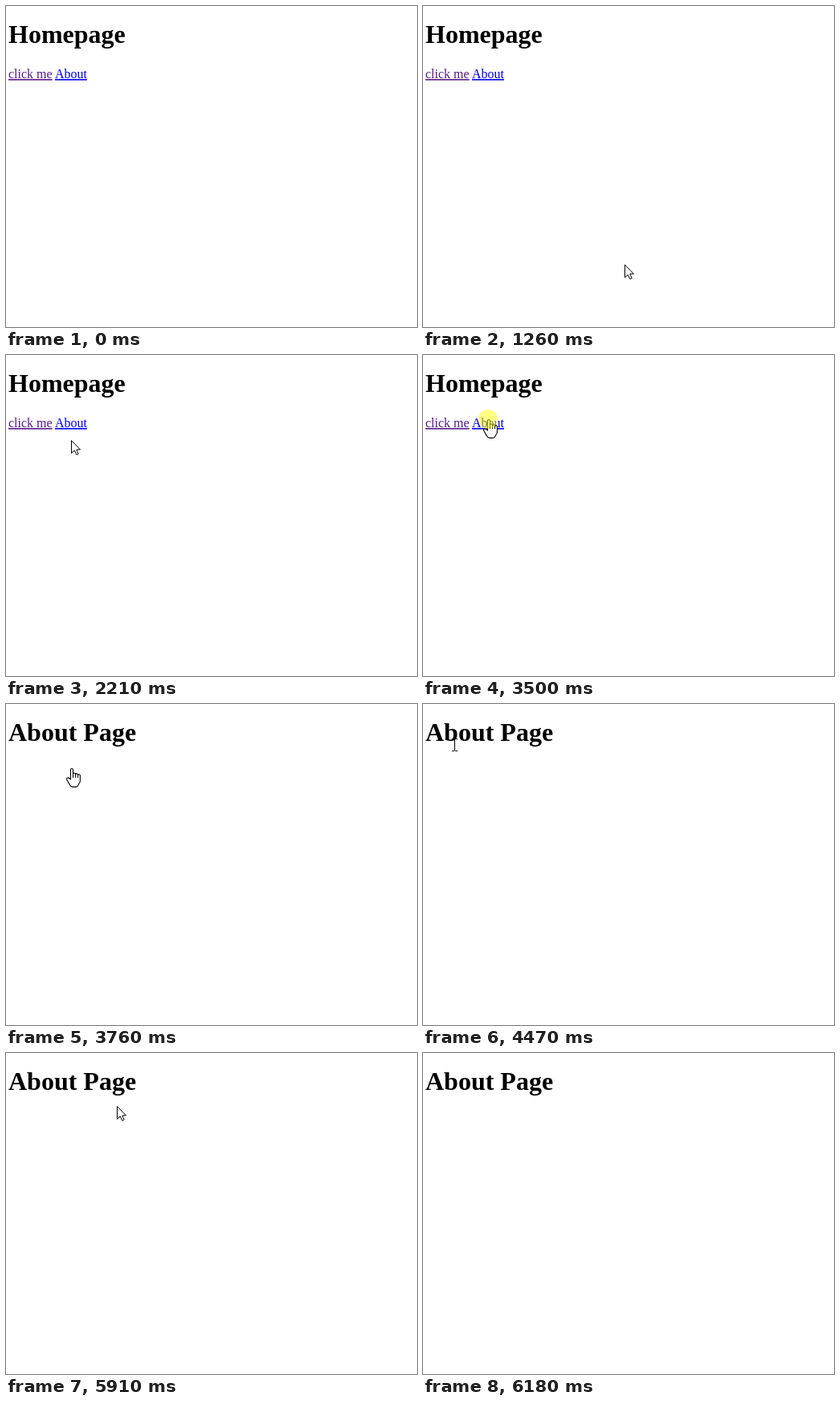
Recreate the animation shown at these times as an HTML page. Size 512 by 400 pixels, loop 7360 ms.

```html
<!DOCTYPE html>
<html lang="en">
<head>
<meta charset="utf-8">
<title>Homepage</title>
<style>
  html, body { margin: 0; width: 100%; height: 100%; overflow: hidden; background: #fff; }
  svg { display: block; width: 512px; height: 400px; }
  text { font: 16px "Liberation Serif", "Times New Roman", serif; }
  .title { font-size: 32px; font-weight: bold; }
  .link { text-decoration: underline; }
  .outline { fill: #fff; stroke: #000; stroke-linejoin: round; }
</style>
</head>
<body>
<svg viewBox="0 0 512 400">
  <g id="home">
    <text class="title" x="3" y="46">Homepage</text>
    <text class="link" x="3" y="90" fill="#551a8b">click me</text>
    <text class="link" x="61" y="90" fill="#0000ee">About</text>
  </g>
  <g id="about">
    <text class="title" x="3" y="46">About Page</text>
  </g>
  <g id="cursor">
    <path id="arrow" class="outline" d="M.5 .5V16.3L4.2 12.9L6.7 18.1Q7.9 18.7 9.2 17.1L6.8 11.9H11.5Z"/>
    <g id="hand">
      <path class="outline" stroke-width="1.1" d="M-.5 14V2Q-.5 .5 1 .5T2.5 2V7.5Q2.7 5.8 4.2 6T5.7 7.8Q6 6.5 7.3 6.7T8.7 8.6Q9 7.5 10.2 7.8T11.4 9.6V15.5Q11.4 18.5 9.3 20.3Q8.5 23.4 5 23.4H2.6Q-.4 23.4 -1.6 20.6L-5 14.8Q-6 12.7 -4.5 12Q-3 11.4 -1.7 13Z"/>
      <path fill="none" stroke="#000" d="M2.5 7V12M5.6 7.6V12M8.6 8.4V12"/>
    </g>
    <path id="beam" fill="none" stroke="#000" d="M-3 -7.5H0M1 -7.5H4M.5 -7V7M-3 7.5H0M1 7.5H4"/>
  </g>
  <circle id="press" cx="81" cy="80" r="12" fill="#ff0" opacity=".5"/>
</svg>
<script>
const LOOP = 7360, PRESS = 3500, RELEASE = 3620, LOAD = 3760, LEAVE = 4270;
const linear = u => u;
const easeOut = u => u * (2 - u);
const easeIn = u => u * u;
const smooth = u => u * u * (3 - 2 * u);

// Pointer moves: first step at, last step at, x, y, steps, easing
const start = [356, 430];
const moves = [
  [1190, 1640, 82, 148, 14, easeOut],
  [1740, 1920, 81, 113, 6, smooth],
  [1950, 1950, 81, 111, 1, linear],
  [2110, 2210, 81, 106, 4, linear],
  [2280, 2370, 81, 96, 3, linear],
  [2630, 2660, 81, 94, 2, linear],
  [2970, 3040, 81, 80, 3, linear],
  [4270, 4470, 39, 51, 7, smooth],
  [4630, 4880, 7, 56, 7, smooth],
  [5060, 5230, 69, 59, 6, easeIn],
  [5260, 5480, 138, 62, 7, easeOut],
  [5910, 6180, 132, 402, 9, easeIn]
];

const el = id => document.getElementById(id);
const show = (id, on) => el(id).setAttribute("visibility", on ? "visible" : "hidden");

function pointerAt(t) {
  let [x, y] = start;
  for (const [from, to, toX, toY, steps, ease] of moves) {
    if (t < from) break;
    const step = t >= to ? steps : 1 + Math.floor((t - from) / (to - from) * (steps - 1));
    const u = ease(step / steps);
    x += (toX - x) * u;
    y += (toY - y) * u;
  }
  return [Math.round(x), Math.round(y)];
}

function shapeAt(t, y) {
  if (t < LOAD) return y < 94 ? "hand" : "arrow";
  if (t < LEAVE) return "hand";
  return y < 55 ? "beam" : "arrow";
}

function draw(t) {
  const [x, y] = pointerAt(t);
  const shape = shapeAt(t, y);
  show("home", t < LOAD);
  show("about", t >= LOAD);
  show("press", t >= PRESS && t < RELEASE);
  for (const id of ["arrow", "hand", "beam"]) show(id, id === shape);
  el("cursor").setAttribute("transform", `translate(${x} ${y})`);
}

const t0 = performance.now();
function tick() {
  draw((performance.now() - t0) % LOOP);
  requestAnimationFrame(tick);
}
draw(0);
requestAnimationFrame(tick);
</script>
</body>
</html>
```
